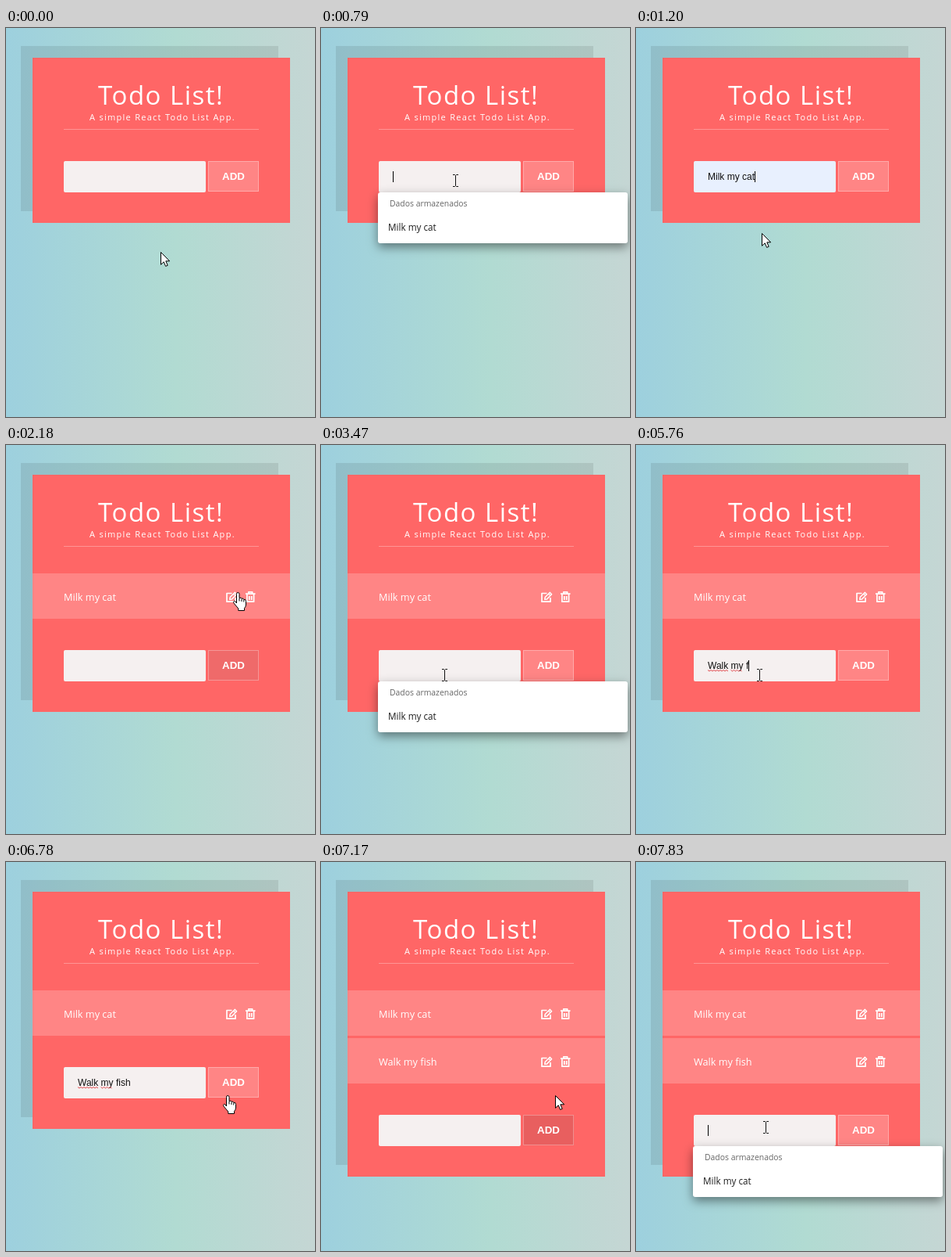
These frames come from a looping animation (396 px wide and 497 px high, 8 s). An HTML page with a canvas:

```html
<!DOCTYPE html>
<html lang="en">
<head>
<meta charset="utf-8">
<title>Todo List</title>
<style>
  html, body { margin: 0; width: 100%; height: 100%; overflow: hidden; }
  canvas { display: block; }
</style>
</head>
<body>
<canvas id="stage" width="396" height="497"></canvas>
<script>
const ctx = document.getElementById('stage').getContext('2d');
const LOOP = 8000;
const SANS = '"Open Sans", "Noto Sans", sans-serif';
const ARIAL = '"Liberation Sans", Arial, sans-serif';
const FIELD_FONT = '12px ' + ARIAL;

// Pointer poses, each held until the next: time, shape, x, y of the hot spot
const pointer = [
  [0, 'arrow', 198, 286], [120, 'arrow', 185, 245], [240, 'arrow', 173, 210],
  [390, 'beam', 175, 204], [510, 'beam', 174, 201], [790, 'beam', 172, 195],
  [930, 'arrow', 161, 250], [1080, 'arrow', 161, 262],
  [1320, 'arrow', 178, 257], [1440, 'arrow', 221, 243], [1560, 'arrow', 263, 226],
  [1680, 'arrow', 287, 212], [1820, 'hand', 296, 188],
  [2300, 'arrow', 272, 218], [2420, 'arrow', 205, 258], [2540, 'beam', 158, 294],
  [6540, 'beam', 178, 295], [6660, 'beam', 232, 297], [6780, 'hand', 283, 298],
  [6900, 'hand', 300, 298], [7170, 'arrow', 300, 298],
  [7320, 'arrow', 268, 303], [7440, 'arrow', 208, 322], [7560, 'beam', 175, 336],
  [7680, 'beam', 166, 339]
];

// Contents of the field
const typed = [
  [0, ''], [1080, 'Milk my cat'], [2060, ''],
  [3590, 'W'], [3870, 'Wal'], [3990, 'Walk'], [4240, 'Walk '], [4380, 'Walk m'],
  [4520, 'Walk m '], [5060, 'Walk my'], [5340, 'Walk my '], [5760, 'Walk my f'],
  [5900, 'Walk my fi'], [6020, 'Walk my fis'], [6140, 'Walk my fish'], [7170, '']
];

const added = [[2060, 'Milk my cat'], [7170, 'Walk my fish']];
const menuOpen = [[660, 1200], [2790, 3590], [7830, LOOP]];
const caretOn = [[660, 1080], [1200, 1820], [2790, 3470], [3590, 6660], [7830, LOOP]];
const hovering = [[1820, 2060], [6900, 7170]];

const during = (spans, t) => spans.some(([from, to]) => t >= from && t < to);
const latest = (keys, t) => keys.filter(key => key[0] <= t).pop();

function rect(x, y, w, h, fill, radius = 0) {
  ctx.fillStyle = fill;
  ctx.beginPath();
  ctx.roundRect(x, y, w, h, radius);
  ctx.fill();
}

function text(string, x, y, font, fill = '#fff', spacing = 0) {
  ctx.font = font;
  ctx.letterSpacing = spacing + 'px';
  ctx.fillStyle = fill;
  ctx.fillText(string, x, y);
  ctx.letterSpacing = '0px';
}

function shape(path, x, y, { fill, stroke, width = 1 }) {
  ctx.save();
  ctx.translate(x, y);
  ctx.lineWidth = width;
  ctx.lineJoin = 'round';
  const outline = new Path2D(path);
  if (fill) { ctx.fillStyle = fill; ctx.fill(outline); }
  if (stroke) { ctx.strokeStyle = stroke; ctx.stroke(outline); }
  ctx.restore();
}

function drawBackdrop() {
  const gradient = ctx.createLinearGradient(0, 0, 396, 0);
  gradient.addColorStop(0, '#9dd0de');
  gradient.addColorStop(0.55, '#b1dbd2');
  gradient.addColorStop(1, '#c5d6d4');
  rect(0, 0, 396, 497, gradient);
}

function drawCard(height) {
  rect(19, 23, 330, height, 'rgba(0,0,0,.09)');
  rect(34, 38, 330, height, '#ff6666');
  text('Todo List!', 118, 98, '33px ' + SANS, '#fff', 1.5);
  text('A simple React Todo List App.', 107, 118, '11px ' + SANS, '#fff', 1.28);
  rect(74, 129, 250, 1, '#ff9494');
}

function drawItem(label, y) {
  rect(34, y, 330, 58, '#ff8585');
  text(label, 74, y + 35, '12.7px ' + SANS);
  const line = { stroke: '#fff', width: 1.7 };
  shape('M7.5 2.5H1V13.2H12V8', 282, y + 23, line);
  shape('M5.2 7.6L11.2 1.4L13.6 3.8L7.6 9.9L4.8 10.3ZM9.6 3.2L11.9 5.5', 282, y + 23,
    { stroke: '#fff', width: 1.5 });
  shape('M0 3.2H12.5M3.8 3V.9H8.7V3M1.9 3.5V13.2H10.6V3.5M4.8 6V11M7.7 6V11', 307, y + 23, line);
}

function buttonColour(t) {
  if (during(hovering, t)) return 'rgb(232,95,95)';
  const release = latest([[-LOOP], [2060], [7170]], t)[0];
  const fade = Math.min(1, Math.floor((t - release) / 120) * 120 / 400);
  const channel = Math.round(95 + 38 * fade);
  return `rgb(${Math.round(232 + 23 * fade)},${channel},${channel})`;
}

function drawSquiggle(from, to, y) {
  ctx.beginPath();
  for (let x = from; x <= to; x += 2) ctx.lineTo(x, y + ((x - from) % 4 ? 1.5 : 0));
  ctx.strokeStyle = '#e0383e';
  ctx.lineWidth = 0.9;
  ctx.stroke();
}

function drawForm(t, y) {
  const value = latest(typed, t)[1];
  const autofilled = t < 2060 && value;
  rect(74, y, 182, 40, autofilled ? '#e8f0fe' : '#f5f0f0', 2);
  text(value, 92, y + 24, FIELD_FONT, '#111');
  const edge = string => 92 + ctx.measureText(string).width;
  if (!autofilled && t >= 4240 && value) {
    drawSquiggle(92, edge('Walk'), y + 25.5);
    if (t >= 5340) drawSquiggle(edge('Walk '), edge('Walk my'), y + 25.5);
  }
  if (during(caretOn, t)) rect(Math.floor(edge(value)), y + 13, 1, 14, '#000');

  rect(259, y, 65, 39, buttonColour(t));
  ctx.strokeStyle = 'rgba(255,255,255,.3)';
  ctx.lineWidth = 1;
  ctx.strokeRect(259.5, y + 0.5, 64, 38);
  text('ADD', 277, y + 24, 'bold 13.33px ' + ARIAL);
}

function drawMenu(t, y) {
  ctx.save();
  ctx.shadowColor = 'rgba(0,0,0,.45)';
  ctx.shadowBlur = 13;
  ctx.shadowOffsetY = 5;
  rect(73, y, 320, 65, '#fff', 3);
  ctx.restore();
  if (t >= 930 && t < 1200) rect(73, y + 30, 320, 31, '#ececec');
  text('Dados armazenados', 88, y + 18, '10.4px ' + SANS, '#666');
  text('Milk my cat', 86, y + 49, '11.7px ' + SANS, '#1c1c1c');
}

function drawPointer([, kind, x, y]) {
  const ink = { fill: '#fff', stroke: '#000' };
  if (kind === 'arrow') {
    shape('M.5 .5V16.3L4.2 12.8L6.6 18.4L9.2 17.3L6.8 11.8H11.7Z', x, y, ink);
  } else if (kind === 'hand') {
    shape('M4.5 14V2.3Q4.5 .5 6.2 .5T8 2.3V7.5Q10.4 6.4 11 8.2Q13.2 7.4 13.8 9.4' +
      'Q16.5 8.8 16.5 11.5V16Q16.5 18.5 14.5 20.5V23.5H6.8V21L1.2 14.3' +
      'Q-.2 12.2 1.4 11.4Q2.8 11 4.5 14ZM8 8V11.5M11 8.5V12M13.8 9.5V12.5', x - 5, y, ink);
  } else {
    shape('M-3 -7.5H-.5L.5 -6.5L1.5 -7.5H4M.5 -6.5V6.5M-3 7.5H-.5L.5 6.5L1.5 7.5H4', x, y,
      { stroke: '#111' });
  }
}

function render(t) {
  const items = added.filter(([time]) => time <= t);
  const formY = items.length ? 201 + 61 * items.length : 170;
  drawBackdrop();
  drawCard(formY + 41);
  items.forEach(([, label], i) => drawItem(label, 164 + 61 * i));
  drawForm(t, formY);
  if (during(menuOpen, t)) drawMenu(t, formY + 40);
  drawPointer(latest(pointer, t));
}

const start = performance.now();
function tick() {
  render((performance.now() - start) % LOOP);
  requestAnimationFrame(tick);
}
tick();
</script>
</body>
</html>
```
